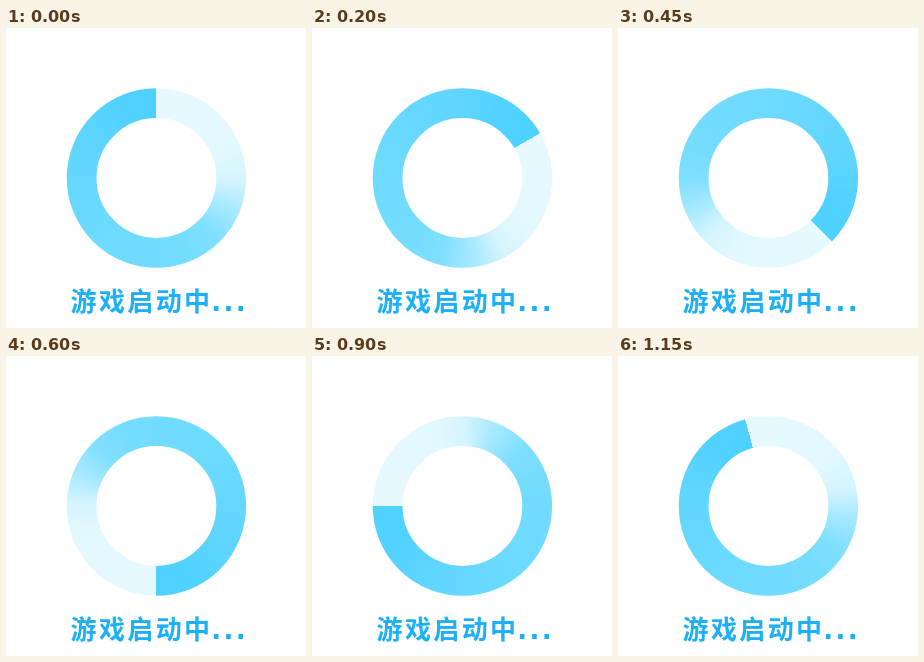
These frames come from a looping animation (300 px wide and 300 px high, 1.2 s). An HTML page with a canvas:

```html
<!DOCTYPE html>
<html lang="zh-CN">
<head>
<meta charset="utf-8">
<style>
  html, body { margin: 0; width: 100%; height: 100%; overflow: hidden; background: #fff; }
  canvas, svg { position: absolute; left: 0; top: 0; }
  text { fill: #1cb0fa; font: 700 26px "Noto Sans CJK SC", "Noto Sans CJK", sans-serif; letter-spacing: 2.4px; }
  .dots { font-family: "DejaVu Sans", sans-serif; }
</style>
</head>
<body>
<canvas width="300" height="300"></canvas>
<svg width="300" height="300">
  <text x="64.5" y="282.5">游戏启动中</text>
  <text class="dots" x="205.3" y="283">...</text>
</svg>
<script>
  const LOOP = 1200, STEP = 50;
  const CX = 150.4, CY = 150, RADIUS = 74.8, WIDTH = 29.8;
  // Clockwise from the sharp edge: degrees, colour
  const STOPS = [
    [0, '#e6f9ff'], [70, '#e2f8ff'], [92, '#d4f4ff'], [112, '#a8e9ff'],
    [135, '#80dfff'], [160, '#74dcff'], [230, '#6cdaff'], [300, '#5ed5ff'],
    [335, '#50d1ff'], [360, '#4fd1ff']
  ];
  const ctx = document.querySelector('canvas').getContext('2d');

  function draw(time) {
    const step = Math.floor((time % LOOP) / STEP);
    const start = step * STEP / LOOP * 2 * Math.PI - Math.PI / 2;
    const fill = ctx.createConicGradient(start, CX, CY);
    for (const [deg, color] of STOPS) fill.addColorStop(deg / 360, color);
    ctx.clearRect(0, 0, 300, 300);
    ctx.beginPath();
    ctx.arc(CX, CY, RADIUS, 0, 2 * Math.PI);
    ctx.lineWidth = WIDTH;
    ctx.strokeStyle = fill;
    ctx.stroke();
  }

  const begin = performance.now();
  function tick() {
    draw(performance.now() - begin);
    requestAnimationFrame(tick);
  }
  tick();
</script>
</body>
</html>
```
